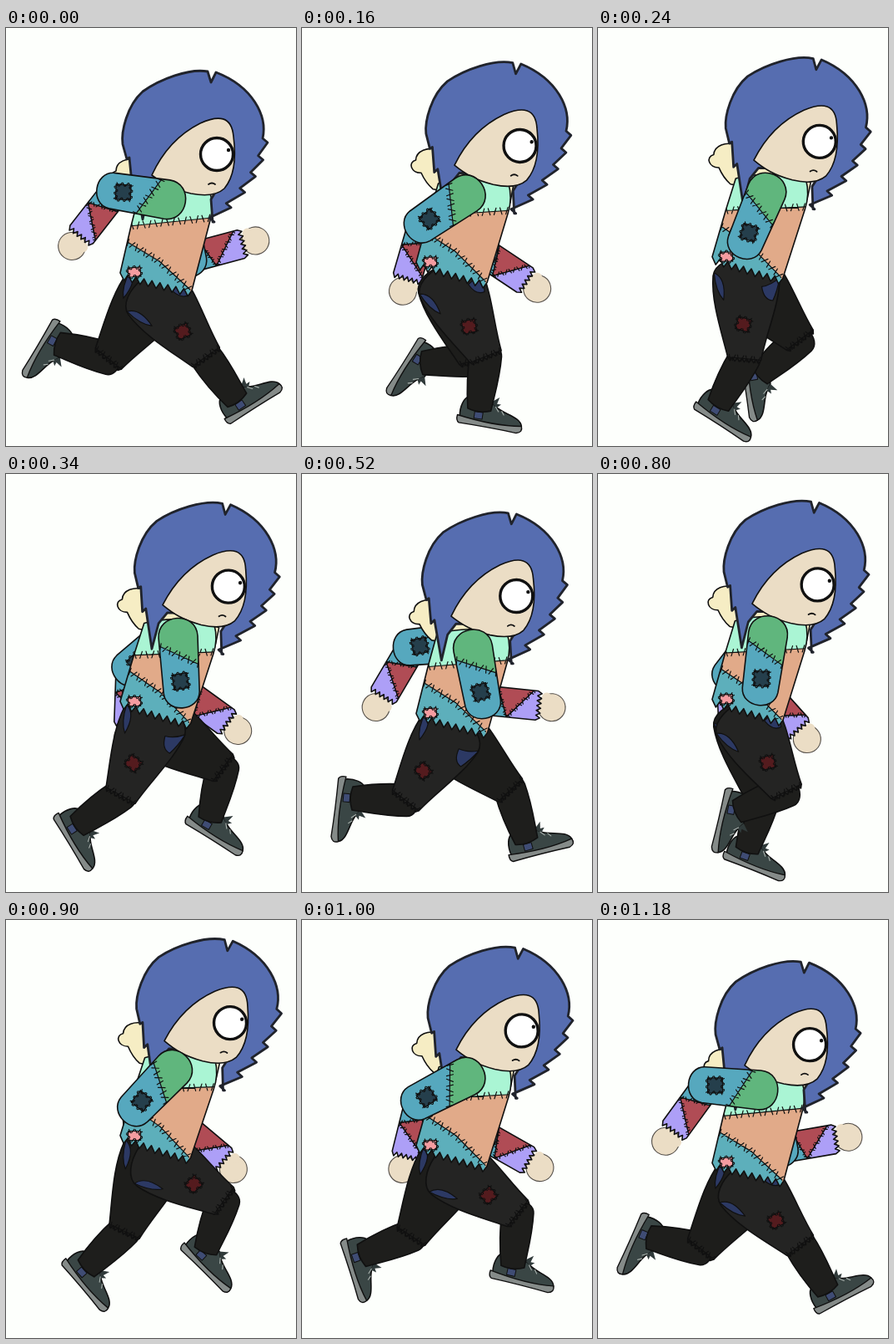
An HTML page with a canvas that plays this animation: 348 px wide and 500 px high, repeating every 1200 ms.

```html
<!DOCTYPE html>
<html lang="en">
<head>
<meta charset="utf-8">
<title>Patchwork runner</title>
<style>
html, body { margin: 0; width: 100%; height: 100%; overflow: hidden; background: #fdfffc; }
canvas { display: block; }
</style>
</head>
<body>
<canvas id="stage" width="348" height="500"></canvas>
<script>
const ctx = document.getElementById('stage').getContext('2d');
const LOOP = 1200, RAD = Math.PI / 180;
const THIGH = 97, SHIN = 63, UPPER_ARM = 72;
const INK = '#101010', TEAL = '#56a8be', SKIN = '#ebddc5';

// One stride in evenly spaced key angles, in degrees forward of straight down.
// Both sides share it; the far side runs half a loop later.
const STRIDE = {
  thigh: [38, 28, -23, -34, -36, 14, 57, 53],
  shin: [36, -4, -46, -80, -106, -92, -20, 2],
  upperArm: [-99, -60, 2, 8, 13, 10, -44, -72],
  forearm: [-38, -21, 50, 66, 105, 60, 6, -24]
};

function angleOf(joint, t) {
  const keys = STRIDE[joint], pos = (t % LOOP) / LOOP * keys.length, i = Math.floor(pos);
  return keys[i] + (keys[(i + 1) % keys.length] - keys[i]) * (pos - i);
}

// The foot stays square to the shin and points its toe while swinging forward
function soleAngle(t) {
  const swing = Math.max(0, Math.cos((t / LOOP - 0.65) * 2 * Math.PI));
  return 2 - angleOf('shin', t) + 32 * swing ** 2;
}

const reach = (p, deg, length) =>
  ({ x: p.x + length * Math.sin(deg * RAD), y: p.y + length * Math.cos(deg * RAD) });

function at(p, deg, draw) {
  ctx.save();
  ctx.translate(p.x, p.y);
  ctx.rotate(deg * RAD);
  draw();
  ctx.restore();
}

function shape(d, fill, stroke = INK, width = 1.6) {
  const path = new Path2D(d);
  if (fill) { ctx.fillStyle = fill; ctx.fill(path); }
  if (stroke) { ctx.strokeStyle = stroke; ctx.lineWidth = width; ctx.stroke(path); }
}

function disc(x, y, r, fill, stroke, width) {
  shape(`M${x - r} ${y}a${r} ${r} 0 1 0 ${2 * r} 0a${r} ${r} 0 1 0 ${-2 * r} 0z`, fill, stroke, width);
}

// Cloth piece: inner colours are clipped to its outline
function cloth(outline, fill, drawInside) {
  shape(outline, fill, null);
  ctx.save();
  ctx.clip(new Path2D(outline));
  drawInside();
  ctx.restore();
  shape(outline, null);
}

// Seam with slightly leaning cross stitches
function seam(x1, y1, x2, y2, size = 4, gap = 6) {
  const dx = x2 - x1, dy = y2 - y1, len = Math.hypot(dx, dy), n = Math.round(len / gap);
  const ux = dx / len, uy = dy / len;
  let d = `M${x1} ${y1}L${x2} ${y2}`;
  for (let i = 0; i < n; i++) {
    const k = (i + 0.5) / n, x = x1 + dx * k, y = y1 + dy * k, s = i % 2 ? 1.5 : -1;
    d += `M${x - uy * size - ux * s} ${y + ux * size - uy * s}L${x + uy * size + ux * s} ${y - ux * size + uy * s}`;
  }
  shape(d, null, INK, 1.2);
}

function patch(x, y, w, h, deg, fill) {
  at({ x, y }, deg, () => {
    ctx.fillStyle = fill;
    ctx.fillRect(-w / 2, -h / 2, w, h);
    for (const side of [-1, 1]) {
      seam(-w / 2, side * h / 2, w / 2, side * h / 2, 2, 4);
      seam(side * w / 2, -h / 2, side * w / 2, h / 2, 2, 4);
    }
  });
}

// Zigzag path segment that continues from the current point
function zigzag(x1, y1, x2, y2, teeth, depth) {
  let d = '';
  for (let i = 1; i <= teeth * 2; i++) {
    const k = i / (teeth * 2);
    d += `L${x1 + (x2 - x1) * k} ${y1 + (y2 - y1) * k + (i % 2 ? depth : 0)}`;
  }
  return d;
}

// Hair tips along a curve down the back of the outline
function spikes(count) {
  let d = '';
  for (let i = 0; i < count; i++) {
    const k = i / (count - 1), j = 1 - k;
    const x = 314 * j * j + 610 * j * k + 250 * k * k;
    const y = 137 * j * j + 380 * j * k + 232 * k * k;
    d = `L${x} ${y}l-6 -5` + d;
  }
  return d;
}

function shoe() {
  shape('M-22 12C-24 0 -20 -10 -15 -12L13 -10L20 -5C30 2 50 2 53 13L53 17L-24 17Z', '#3a4645');
  shape('M-25 11Q-26 18 -22 20Q15 20 48 22Q56 20 53 13Q20 18 -25 11Z', '#858b89', INK, 1.4);
  shape('M13 -10L22 -17L20 -9L25 -9L20 -4Z', '#303a3a', null);
  shape('M19 -5l4 5m4 -1l3 4', null, '#a9b1ad', 1.1);
  shape('M-5 4h10v8h-10z', '#3f4c74', INK, 1);
}

function leg(hip, t, near) {
  const thigh = angleOf('thigh', t), shin = angleOf('shin', t);
  const knee = reach(hip, thigh, THIGH), ankle = reach(knee, shin, SHIN);
  at(ankle, soleAngle(t), shoe);
  at(knee, -shin, () =>
    shape('M-19 0C-19 -20 18 -20 19 -2C20 24 16 44 14 64Q0 69 -14 64C-18 42 -20 25 -19 0Z', '#1e1e1c'));
  at(hip, -thigh, () => {
    shape(`M-20 96C-29 66 -43 30 -42 0C-40 -30 34 -32 38 0C39 30 25 65 20 98${zigzag(20, 98, -20, 96, 7, 4)}Z`,
      near ? '#242423' : '#1d1d1b');
    shape('M-41 -4Q-26 2 -28 28Q-38 18 -41 -4Z', '#2c3964', INK, 1.2);
    shape('M38 -2Q28 8 17 10Q20 26 31 26Q36 14 38 -2Z', '#2c3964', INK, 1.2);
    if (near) patch(-3, 56, 16, 15, 14, '#541b1e');
    seam(-20, 96, 20, 98, 3.5, 5);
  });
}

function forearm(elbow, deg) {
  at(elbow, -deg, () => {
    disc(0, 84, 16.5, SKIN, '#55504a', 1.1);
    disc(11, 77, 6, SKIN, null);
    cloth(`M-17 -4C-16 -18 17 -18 18 -4L18 66${zigzag(18, 66, -17, 66, 6, 5)}Z`, '#ad9ff7', () => {
      shape('M-20 -20H20V18L-20 34Z', TEAL, null);
      shape('M20 17L-17 31L20 63Z', '#b04c55', INK, 1.2);
      seam(20, 17, -17, 31, 2, 5);
      seam(-17, 31, 20, 63, 2.5, 5);
    });
  });
}

function upperArm(shoulder, deg) {
  at(shoulder, -deg, () => {
    cloth('M-23 9C-23 -21 24 -21 24 9L22 76C20 100 -19 100 -21 76Z', TEAL, () => {
      shape('M-30 -30H30V47L-30 14Z', '#60b67d', null);
      seam(-24, 18, 25, 44, 4, 6);
    });
    patch(0, 62, 18, 18, -6, '#253f4c');
  });
}

function torso() {
  shape('M160 158C145 154 132 160 132 171C122 174 127 187 139 186Q145 198 154 205L247 218L250 198L210 175Z', '#f6edc4');
  cloth(`M160 198C180 190 225 188 244 194Q250 212 245 230L223 314${zigzag(223, 314, 137, 293, 9, 8)}L150 237Z`,
    '#e1aa89', () => {
      shape('M140 180H255V226L140 238Z', '#aaf5d4', null);
      shape('M140 252L184 279L221 312V340H125V290Z', '#5dafbb', null);
      seam(148, 237, 247, 227, 4, 7);
      seam(144, 255, 184, 279, 4, 6);
      seam(184, 279, 221, 313, 4, 6);
    });
  patch(154, 292, 15, 11, -4, '#f59ca0');
}

function head() {
  shape('M246 65L242 52C220 48 185 61 164 76C145 93 138 124 140 139L145 157L148 155L151 185L155 181L164 229L171 198L181 185'
    + `L258 185L246 205L248 232${spikes(6)}C314 105 296 70 252 53Z`, '#566db0', '#20232b', 2.8);
  cloth('M175 176C187 150 205 128 233 114C255 104 271 105 273 130C277 160 272 180 262 192'
    + 'C250 203 232 200 222 198C200 193 188 186 175 176Z', SKIN, () => {
    disc(253, 151, 19.5, '#fff', INK, 3.4);
    disc(267, 146, 2.2, INK, null);
    shape('M243 187Q247 184 251 187', null, INK, 1.8);
  });
}

function drawScene(t) {
  // The body rises and sinks once per step, higher on the second one
  const far = t + LOOP / 2, bob = 1 - Math.abs(1 - t % 600 / 300);
  const lift = bob * (t < 600 ? 23 : 34), lean = 4 * bob;
  const hip = { x: 180, y: 317 - lift };
  const shoulder = { x: 202 + lean, y: 206 - lift };
  const drawUpperArm = time => upperArm(shoulder, angleOf('upperArm', time));
  const drawForearm = time =>
    forearm(reach(shoulder, angleOf('upperArm', time), UPPER_ARM), angleOf('forearm', time));

  ctx.fillStyle = '#fdfffc';
  ctx.fillRect(0, 0, 348, 500);
  ctx.lineJoin = ctx.lineCap = 'round';

  drawForearm(far);
  drawUpperArm(far);
  drawForearm(t);
  leg(hip, far, false);
  leg(hip, t, true);
  at({ x: 154, y: 293 - lift }, lean, () => {
    ctx.translate(-154, -293);
    torso();
  });
  at({ x: 253 + 16 * bob, y: 151 - 0.82 * lift }, 2.5 * bob, () => {
    ctx.translate(-253, -151);
    head();
  });
  drawUpperArm(t);
}

const start = performance.now();
function tick() {
  const t = (performance.now() - start) % LOOP;
  drawScene(Math.floor(t / 20) * 20);
  requestAnimationFrame(tick);
}
tick();
</script>
</body>
</html>
```
